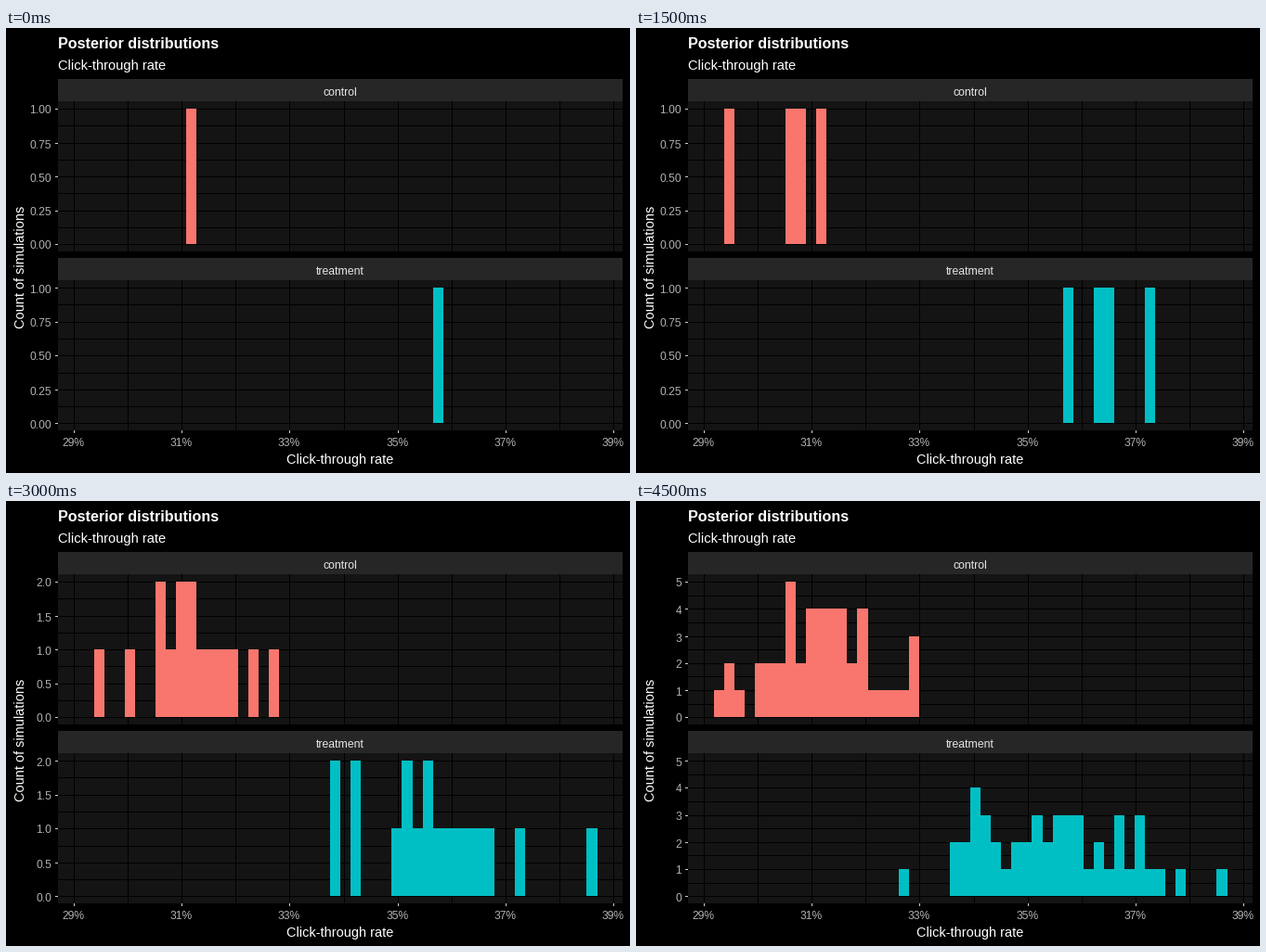
A matplotlib script for the animation above (5 s loop, 672 by 480 pixels).

```python
import matplotlib.pyplot as plt
import numpy as np
from matplotlib.animation import FuncAnimation
from matplotlib.patches import Rectangle

W, H, DPI = 672, 480, 100
LEFT, RIGHT = 56, 664
BINS = 50
EDGES = np.round(83.65 + 11.058 * np.arange(BINS + 1))

# Bins that receive a new simulation at each step
CONTROL = [
    [10], [1], [7], [8], [10, 12, 14, 18], [9, 9], [4, 7, 11, 13, 16],
    [0, 2, 11, 12, 14, 15, 19],
    [6, 9, 11, 11, 12, 12, 17, 19, 19],
    [1, 4, 5, 5, 6, 7, 7, 7, 8, 9, 10, 10, 13, 14, 14],
]
TREATMENT = [
    [34], [38], [37], [42], [32, 36, 39, 49], [24, 26, 31, 33],
    [24, 26, 30, 31, 33, 35],
    [25, 25, 27, 27, 28, 29, 30],
    [18, 29, 34, 34, 39, 39, 41, 45],
    [23, 23, 25, 25, 26, 31, 32, 33, 35, 35, 37, 40, 41, 41, 43],
]
# name, steps, bar colour, strip top
PANELS = [
    ("control", CONTROL, "#F8766D", 55),
    ("treatment", TREATMENT, "#00BFC4", 248),
]

plt.rcParams["font.family"] = "Liberation Sans"
fig = plt.figure(figsize=(W / DPI, H / DPI), dpi=DPI, facecolor="black")
ax = fig.add_axes([0, 0, 1, 1])


def box(x0, y0, x1, y1, color):
    ax.add_patch(Rectangle((x0, y0), x1 - x0, y1 - y0, facecolor=color,
                           linewidth=0, antialiased=False))


def label(x, y, text, px, color="white", **kw):
    ax.text(x, y, text, fontsize=px * 72 / DPI, color=color,
            va="baseline", **kw)


def counts(steps, i):
    flat = [b for step in steps[:i + 1] for b in step]
    return np.bincount(flat, minlength=BINS)


def draw_panel(name, steps, color, top, i, peak):
    base = top + 178.4
    scale = 146.4 / peak
    step = {1: 0.25, 2: 0.5}.get(peak, 1)
    digits = {1: 2, 2: 1}.get(peak, 0)

    def level(v):
        return round(base - v * scale)

    box(LEFT, top, RIGHT, top + 24, "#262626")
    label(360, top + 18, name, 12.2, "#E5E5E5", ha="center")
    box(LEFT, top + 24, RIGHT, top + 186, "#141414")

    for k in range(11):
        x = round(73 + 58.1 * k)
        box(x, top + 24, x + 1, top + 186, "black")
    for v in np.arange(0, peak + step / 4, step / 2):
        box(LEFT, level(v), RIGHT, level(v) + 1, "black")
    for v in np.arange(0, peak + step / 2, step):
        box(53, level(v), LEFT, level(v) + 1, "#CCCCCC")
        label(49, level(v) + 5.5, f"{v:.{digits}f}", 12, "#B2B2B2", ha="right")

    for b, n in enumerate(counts(steps, i)):
        if n:
            box(EDGES[b], level(n), EDGES[b + 1], level(0), color)


def draw(i):
    ax.clear()
    ax.set_xlim(0, W)
    ax.set_ylim(H, 0)
    ax.axis("off")

    label(56, 22, "Posterior distributions", 16.15, weight="bold")
    label(56, 45, "Click-through rate", 14.6)
    label(360, 470, "Click-through rate", 14.55, ha="center")
    label(20, 257.5, "Count of simulations", 14.55, ha="center",
          rotation=90, rotation_mode="anchor")

    peak = max(counts(p[1], i).max() for p in PANELS)
    for panel in PANELS:
        draw_panel(*panel, i, int(peak))

    for k in range(6):
        x = round(73 + 116.2 * k)
        box(x, 434, x + 1, 437, "#CCCCCC")
        label(x - 0.5, 451, f"{29 + 2 * k}%", 12, "#B2B2B2", ha="center")
    return []


anim = FuncAnimation(fig, draw, frames=len(CONTROL), interval=500,
                     init_func=lambda: draw(0), repeat=True, repeat_delay=0)
plt.show()
```
